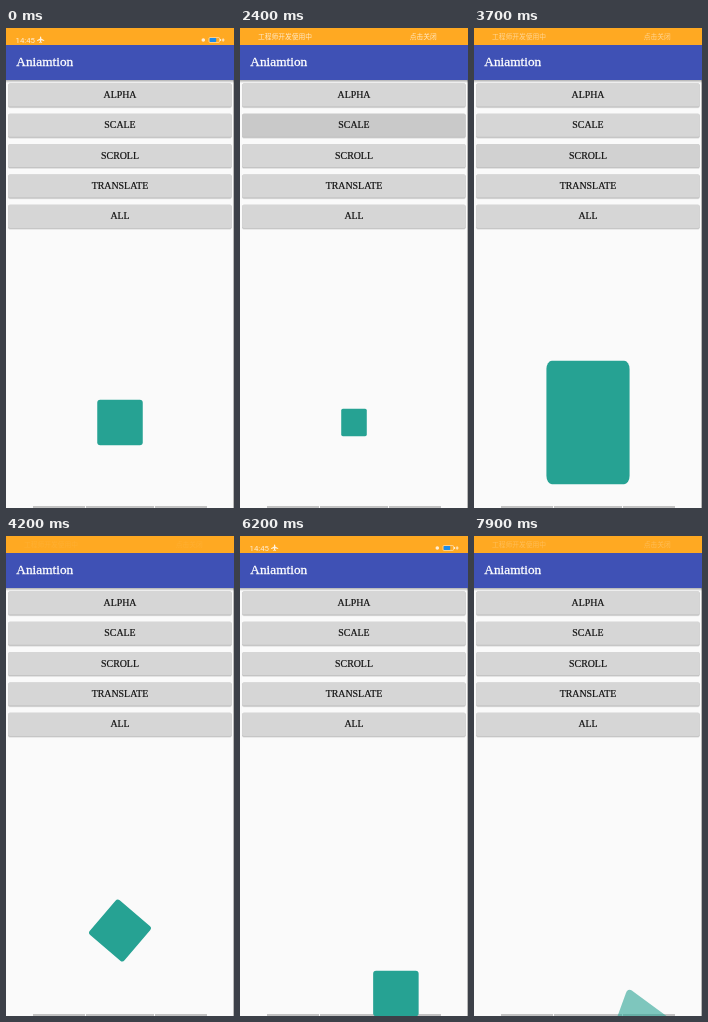
These frames come from a looping animation (228 by 480 pixels, 8 s). An HTML page:

```html
<!DOCTYPE html>
<html lang="en">
<head>
<meta charset="utf-8">
<title>Animation demo</title>
<style>
  html, body { margin: 0; width: 100%; height: 100%; overflow: hidden; background: #fafafa; }
  svg { display: block; width: 100vw; height: 100vh; }
  .serif { font-family: "Liberation Serif", serif; }
  .clock { font: 7.8px Roboto, sans-serif; }
  .note { font: 6.75px "Noto Sans CJK SC", "Noto Sans CJK", sans-serif; }
</style>
</head>
<body>
<svg viewBox="0 0 228 480" xmlns="http://www.w3.org/2000/svg">
  <defs>
    <linearGradient id="shade" x1="0" y1="0" x2="0" y2="1">
      <stop offset="0" stop-color="#000" stop-opacity=".3"/>
      <stop offset="1" stop-color="#000" stop-opacity="0"/>
    </linearGradient>
  </defs>
  <rect width="228" height="480" fill="#fafafa"/>
  <rect x="227" y="52" width="1" height="428" fill="#b8b8b8"/>
  <g fill="#c2c2c2">
    <rect x="27" y="478" width="52" height="2"/>
    <rect x="80" y="478" width="68" height="2"/>
    <rect x="149" y="478" width="52" height="2"/>
  </g>
  <g id="buttons"></g>
  <g id="tap" opacity="0">
    <rect x="14" y="148" width="61" height="22" rx="3" fill="#c0c0c0"/>
    <circle cx="23" cy="160.5" r="6" fill="#d2d2d2"/>
  </g>
  <g id="labels" class="serif" font-size="9.9" text-anchor="middle" fill="#111" stroke="#111" stroke-width=".2"></g>
  <rect id="icon" x="-22.75" y="-22.75" width="45.5" height="45.5" rx="3" fill="#26a293"/>

  <rect y="52" width="228" height="3" fill="url(#shade)"/>
  <rect y="16" width="228" height="36" fill="#3f51b5"/>
  <rect width="228" height="17" fill="#ffa922"/>
  <text class="serif" x="10.3" y="38" font-size="13.3" fill="#fff" stroke="#fff" stroke-width=".3">Aniamtion</text>

  <g id="clock" fill="#fff">
    <text class="clock" x="9.5" y="14.6" fill-opacity=".8">14:45</text>
    <path d="M31 12.2 34 10.6V9a.6.6 0 0 1 1.2 0v1.6l3 1.6v.8l-3-.8v1.6l.9.7v.5l-1.5-.4-1.5.4v-.5l.9-.7v-1.6l-3 .8z" fill-opacity=".85"/>
    <circle cx="197.3" cy="12" r="1.8" fill-opacity=".8"/>
    <rect x="203" y="9.6" width="10.6" height="4.8" rx="1" fill="none" stroke="#fff" stroke-width=".6" stroke-opacity=".85"/>
    <rect x="203.6" y="10.1" width="6.6" height="3.8" rx=".6" fill="#1e8be8"/>
    <path d="M214 11h.9v2H214zM215.7 11.6h1v-1.4h.8v1.4h1v.8h-1v1.4h-.8v-1.4h-1z" fill-opacity=".85"/>
  </g>
  <g id="notice" class="note" fill="#fff">
    <text x="18" y="11.2" fill-opacity=".75">工程师开发使用中</text>
    <text x="169.7" y="11.2" fill-opacity=".75">点击关闭</text>
  </g>
</svg>
<script>
  const LOOP = 8000, TICK = 100;
  const HOME = { x: 114, y: 394.5 };
  const UNIT = 228 / 1080; // device pixel on the stage
  const actions = [
    { label: "ALPHA", start: 590, span: 2000, fade: true },
    { label: "SCALE", start: 2140, span: 2000, scale: true },
    { label: "SCROLL", start: 3765, span: 2000, spin: true },
    { label: "TRANSLATE", start: 5190, span: 2000, move: true },
    { label: "ALL", start: 6686, span: 2214, fade: true, scale: true, spin: true, move: true }
  ];

  const $ = id => document.getElementById(id);
  const clamp = v => Math.min(1, Math.max(0, v));
  const ramp = (t, from, to) => clamp((t - from) / (to - from));
  const mix = (a, b, p) => a + (b - a) * p;
  const ease = v => (1 - Math.cos(Math.PI * clamp(v))) / 2;

  function add(parent, tag, attrs) {
    const el = document.createElementNS("http://www.w3.org/2000/svg", tag);
    for (const key in attrs) el.setAttribute(key, attrs[key]);
    return parent.appendChild(el);
  }

  actions.forEach((action, i) => {
    const y = 55.2 + i * 30.35, box = { x: 2.2, width: 223.4, rx: 1.6 };
    const group = $("buttons");
    add(group, "rect", { ...box, y: y + 0.5, height: 24.6, fill: "#e3e3e3" });
    add(group, "rect", { ...box, y: y + 0.4, height: 23.8, fill: "#bdbdbd" });
    action.face = add(group, "rect", { ...box, y, height: 23.3 });
    add($("labels"), "text", { x: 114, y: y + 14.8 }).textContent = action.label;
  });

  function drawIcon(t) {
    const now = actions.filter(a => t >= a.start).pop() || { start: 0, span: 1 };
    const p = ease((t - now.start) / now.span);
    const sx = now.scale ? mix(0.5, 2, p) : 1;
    const sy = now.scale ? mix(0.5, 3, p) : 1;
    const dx = now.move ? mix(300, 100, p) * UNIT : 0;
    const dy = now.move ? mix(400, 200, p) * UNIT : 0;
    const turn = now.spin ? 360 * p : 0;
    $("icon").setAttribute("transform",
      `translate(${HOME.x} ${HOME.y}) scale(${sx} ${sy}) translate(${dx} ${dy}) rotate(${turn})`);
    $("icon").setAttribute("opacity", now.fade ? p : 1);
  }

  function draw(t) {
    for (const { face, start } of actions) {
      const press = ramp(t, start - 100, start) * (1 - ramp(t, start + 320, start + 420));
      const grey = Math.round(mix(214, 201, press));
      face.setAttribute("fill", `rgb(${grey},${grey},${grey})`);
    }
    $("tap").setAttribute("opacity", t >= 5200 && t < 5400 ? 1 : 0);
    drawIcon(t);

    const clock = t < 4000 ? 1 - ramp(t, 650, 1450)
      : ramp(t, 4270, 5070) * (1 - ramp(t, 6850, 7650));
    const notice = t < 5000 ? ramp(t, 1450, 2250) * (1 - ramp(t, 3450, 4270))
      : ramp(t, 7650, 8450);
    $("clock").setAttribute("opacity", clock);
    $("notice").setAttribute("opacity", notice);
  }

  const begin = performance.now();
  function frame() {
    const t = (performance.now() - begin) % LOOP;
    draw(Math.floor(t / TICK) * TICK);
    requestAnimationFrame(frame);
  }
  frame();
</script>
</body>
</html>
```
